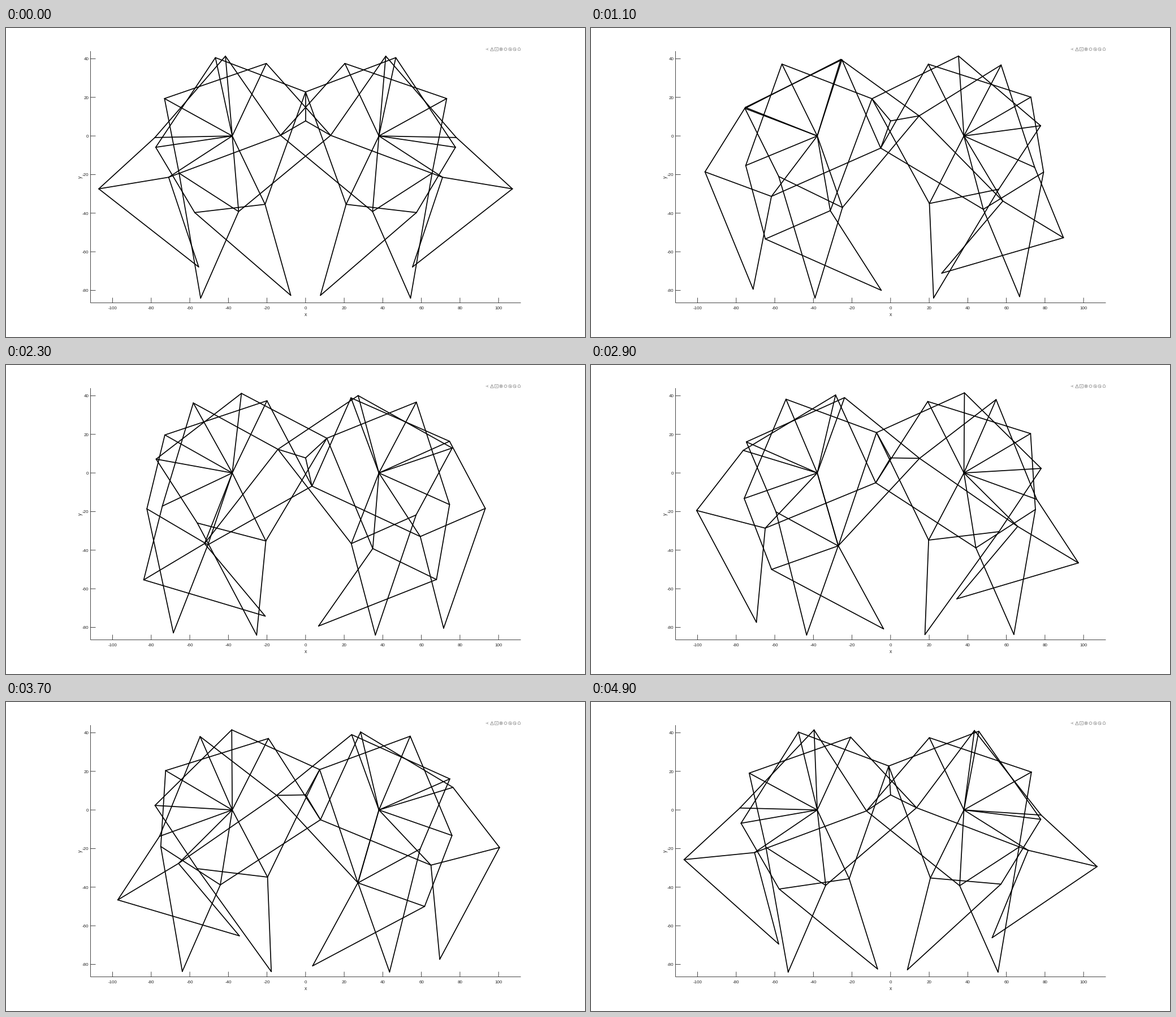
These frames come from a looping animation (1024 by 547 pixels, 5000 ms). A matplotlib script:

```python
import numpy as np
import matplotlib.pyplot as plt
from matplotlib.animation import FuncAnimation
from matplotlib.collections import LineCollection

W, H, DPI = 1024, 547, 64
PX = 72 / DPI                       # points per pixel
FRAMES, STEP = 50, np.radians(720 / 99)
SCALE, ORIGIN = np.array([3.413, -3.417]), np.array([529.85, 191.1])
INK, GREY = "#262626", "#8a8a8a"

HUB, CRANK = np.array([0, 7.8]), 15
PIVOT = np.array([-38, 0])
MIRROR = np.array([-1, 1])

plt.rcParams["font.family"] = "Liberation Sans"
fig = plt.figure(figsize=(W / DPI, H / DPI), dpi=DPI, facecolor="white")
ax = fig.add_axes([0, 0, 1, 1])
ax.set(xlim=(0, W), ylim=(H, 0))
ax.axis("off")


def to_px(points):
    return ORIGIN + SCALE * np.asarray(points)


def line(xs, ys, color=INK):
    ax.plot(xs, ys, color=color, lw=0.85 * PX, solid_capstyle="butt", snap=False)


def label(x, y, text, size=8, ha="center", **kw):
    ax.text(x, y, text, color=INK, fontsize=size * PX, ha=ha,
            va="center_baseline", **kw)


def draw_axes():
    left, right, top, bottom, tick = 149.5, 910.5, 41, 486.5, 9
    line([left, right], [bottom, bottom])
    line([left, left], [top, bottom])
    for v in range(-100, 101, 20):
        x = to_px([v, 0])[0]
        line([x, x], [bottom, bottom - tick])
        label(x, bottom + 9.2, str(v))
    for v in range(-80, 41, 20):
        y = to_px([0, v])[1]
        line([left, left + tick], [y, y])
        label(left - 3, y + 0.3, str(v), ha="right")
    label(530, 506.3, "x", 8.8)
    label(130, 264.3, "y", 8.8, rotation=90, rotation_mode="anchor")


def draw_toolbar():
    """Eight outline icons: a marker each, with a small mark inside."""
    style = dict(mfc="none", mec=GREY, mew=0.75 * PX, ls="none", snap=False)
    for k, (outer, inner) in enumerate(zip("3^sohoop", " _+s +_ ")):
        x, y = 850.7 + 8 * k, 36.5
        ax.plot(x, y, marker=outer, ms=5.2 * PX, **style)
        ax.plot(x, y, marker=inner, ms=2.6 * PX, **style)
        if k in (5, 6):             # magnifier handles
            line([x + 1.8, x + 3.4], [y + 1.8, y + 3.4], GREY)


def meet(p, r, q, s, side=1):
    """Point at distance r from p and s from q, on the chosen side of p-q."""
    d = q - p
    dist = np.hypot(*d)
    u = d / dist
    along = (r * r - s * s + dist * dist) / (2 * dist)
    off = np.sqrt(max(r * r - along * along, 0))
    return p + along * u + side * off * np.array([u[1], -u[0]])


def leg(tip):
    """Bars of one left-hand Jansen leg."""
    top = meet(tip, 50, PIVOT, 41.5)
    low = meet(tip, 61.9, PIVOT, 39.3, -1)
    back = meet(top, 55.8, PIVOT, 40.1)
    knee = meet(back, 39.4, low, 36.7)
    foot = meet(knee, 65.7, low, 49)
    return np.array([(tip, top), (tip, low), (PIVOT, top), (PIVOT, back),
                     (top, back), (PIVOT, low), (back, knee), (knee, low),
                     (knee, foot), (low, foot)])


def linkage(angle):
    bars = []
    for a in angle + np.arange(3) * 2 * np.pi / 3:
        tip = HUB + CRANK * np.array([np.cos(a), np.sin(a)])
        bars += [(HUB, tip), *leg(tip), *(leg(tip * MIRROR) * MIRROR)]
    return to_px(bars)


draw_axes()
draw_toolbar()
bars = LineCollection([], colors="black", linewidths=1.7 * PX,
                      capstyle="round", zorder=3)
ax.add_collection(bars, autolim=False)


def update(i):
    bars.set_segments(linkage(np.pi / 2 - STEP * i))
    return [bars]


anim = FuncAnimation(fig, update, frames=FRAMES, interval=100,
                     repeat=True, repeat_delay=0, blit=False)
plt.show()
```
